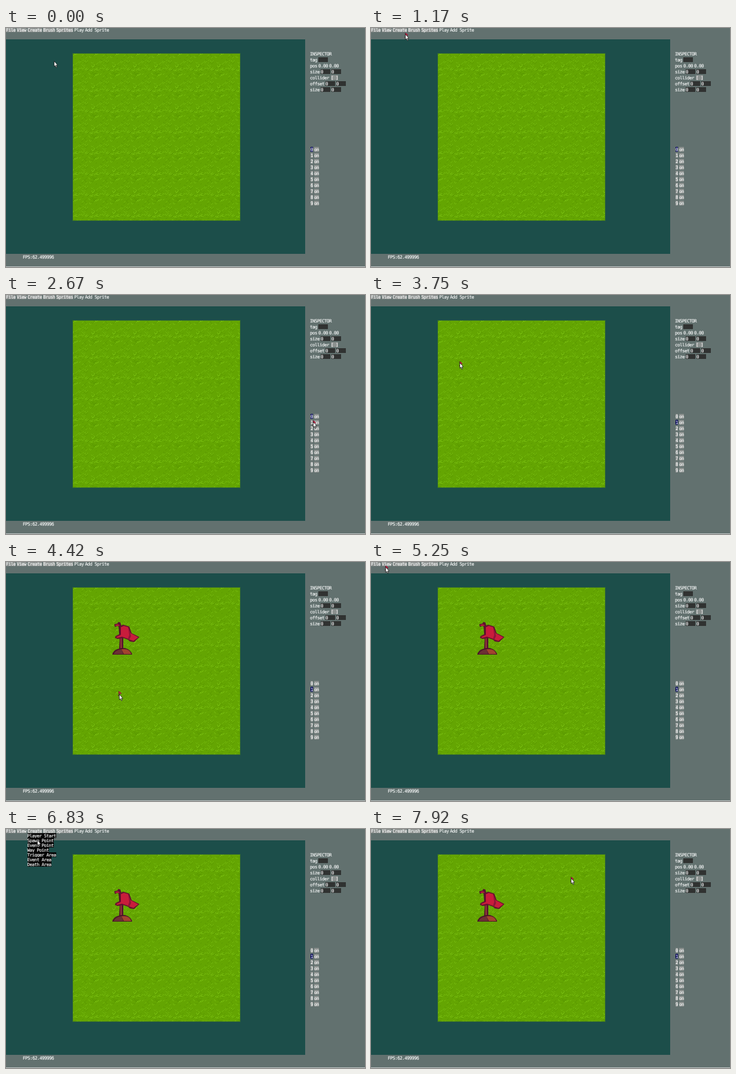
Write an HTML page with a canvas that moves like this. It is 600 by 400 pixels and loops after 8000 ms.

```html
<!DOCTYPE html>
<html lang="en">
<head>
<meta charset="utf-8">
<title>Level editor</title>
<style>
html, body { margin: 0; width: 100%; height: 100%; overflow: hidden; background: #62716f; }
#stage { position: relative; width: 600px; height: 400px; overflow: hidden; }
#stage > * { position: absolute; left: 0; top: 0; }
#stage > #view { width: 500px; height: 359px; top: 19px; background: #1c4e4a; }
#stage > #edge { width: 600px; height: 1px; top: 399px; background: #c3c9c8; }
#stage > #grass { left: 112px; top: 43px; box-shadow: 0 0 0 1px rgba(100, 166, 2, .3); }
text {
  font: 7.5px "DejaVu Sans Mono", "Liberation Mono", monospace;
  letter-spacing: -.515px;
  fill: #f6f8f8;
  stroke: #f6f8f8;
  stroke-width: .15px;
  white-space: pre;
}
rect { shape-rendering: crispEdges; }
</style>
</head>
<body>
<div id="stage">
  <div id="view"></div>
  <div id="edge"></div>
  <canvas id="grass" width="279" height="279"></canvas>
  <svg width="600" height="400" viewBox="0 0 600 400">
    <defs>
      <g id="flag">
        <path fill="#52122c" d="M187 101H191L193 108 196 128V146H189L190 130 188 107Z"/>
        <path fill="#8a3438" d="M191 109H193L194 145H191Z"/>
        <path fill="#5c1230" d="M181 104L186 103 188 100 192 104 191 109 186 107 182 109Z"/>
        <path fill="#b01c3a" d="M183 105L187 104 190 106 189 107 183 107Z"/>
        <path fill="#64102e" d="M190 107L196 105 206 108 210 119 223 125.500 214 134 207 133 204 130 195 127 187 129 182 127 183 124 191 120Z"/>
        <path fill="#c81c3c" d="M192 109L197 107 204 109 208 119 221 126 213 132 207 130 203 128 194 125 186 127 184 125.500 192 122Z"/>
        <path fill="#901436" d="M204 109L208 120 209 124 206 130 204 128 206 122Z"/>
        <path fill="#4a1428" d="M177.500 155Q179 148 187 145.500 196 142 204 146 210 150 211 155Z"/>
        <path fill="#6c3034" d="M180 154Q182 149 188 147L193 146 196 154Z"/>
        <path fill="#a2442e" d="M197 154L193 146Q206 144 209.500 154Z"/>
      </g>
    </defs>
    <g id="ui"></g>
    <use id="placed" href="#flag"/>
    <g id="menu"></g>
    <use id="preview" href="#flag"/>
    <path id="cursor" fill="#fff" stroke="#151515" stroke-width=".8"
      d="M.4 .4V9.4L2.3 7.7 3.8 11.2 5.2 10.6 3.8 7.2H6.4Z"/>
  </svg>
</div>
<script>
const $ = id => document.getElementById(id);
const LOOP = 8000, TICK = 1000 / 12;
const BUTTON = '#8c918f', FIELD = '#303231', BLACK = '#050505', NAVY = '#000058';

function add(parent, tag, attrs) {
  const el = document.createElementNS('http://www.w3.org/2000/svg', tag);
  for (const key in attrs) el.setAttribute(key, attrs[key]);
  return parent.appendChild(el);
}

// A label on an optional box; returns where the next one starts.
function label(parent, str, x, y, fill, chars = str.length) {
  if (fill) add(parent, 'rect', { x, y: y - 1, width: chars * 4, height: 8, fill });
  add(parent, 'text', { x, y: y + 6.1 }).textContent = str;
  return x + chars * 4 + 2;
}

function buildUi() {
  const ui = $('ui');
  let x = 0;
  ['File', 'View', 'Create', 'Brush', 'Sprites', 'Play', 'Add Sprite'].forEach((s, i) => {
    x = label(ui, s, x, 0, i < 5 && BUTTON);
  });

  const rows = [
    ['INSPECTOR'], ['tag', ''], ['pos'], ['size', '0', '0'],
    ['collider'], ['offset', '0', '0'], ['size', '0', '0']
  ];
  rows.forEach(([name, ...fields], i) => {
    const y = 40 + i * 10;
    let x = label(ui, name, 508, y);
    for (const f of fields) x = label(ui, f, x, y, FIELD, 4);
    if (name === 'pos') label(ui, '0.00', label(ui, '0.00', x, y), y);
    if (name === 'collider') label(ui, '[ ]', x + 1, y, BUTTON);
  });

  for (let i = 0; i < 10; i++) {
    const y = 200 + i * 10;
    label(ui, 'on', label(ui, String(i), 509, y, BUTTON), y, BUTTON);
  }

  ['Player Start', 'Spawn Point', 'Event Point', 'Way Point',
    'Trigger Area', 'Event Area', 'Death Area'].forEach((s, i) => {
    label($('menu'), s, 35.5, 8 + i * 8, BLACK);
  });
}

function drawGrass() {
  const size = 35, tile = document.createElement('canvas');
  tile.width = tile.height = size;
  const t = tile.getContext('2d');
  let seed = 17;
  const rnd = n => (seed = seed * 16807 % 2147483647) % n;
  const dot = (x, y) => t.fillRect((x + size) % size, (y + size) % size, 1, 1);
  t.fillStyle = '#64a502';
  t.fillRect(0, 0, size, size);
  // Tufts: two blades spreading from one root, dark ones under light ones
  for (let i = 0; i < 64; i++) {
    const x = rnd(size), y = rnd(size), left = rnd(4), right = 1 + rnd(4);
    t.fillStyle = i < 30 ? '#5b9a00' : '#73b80c';
    for (let j = 0; j < left; j++) dot(x - (j + 1 >> 1), y - j);
    for (let j = 0; j < right; j++) dot(x + 1 + j, y - j);
  }
  const g = $('grass').getContext('2d');
  g.fillStyle = g.createPattern(tile, 'repeat');
  g.fillRect(0, 0, 279, 279);
}

// Pointer path: tick, x, y
const path = [
  [0, 80, 55], [6, 51, 1], [7, 51, 1], [9, 57, 10], [14, 57, 10],
  [19, 208, 93], [22, 208, 93], [29, 525, 200], [32, 513, 212], [39, 513, 212],
  [45, 148, 113], [49, 167, 125], [54, 191, 232], [57, 191, 232],
  [63, 24, 8], [67, 25, 4], [70, 25, 4], [74, 40, 1], [76, 40, 1],
  [82, 52, 18], [84, 52, 18], [93, 323, 107], [95, 334, 82], [96, 334, 82]
];

function pointAt(k) {
  const i = Math.max(1, path.findIndex(p => p[0] >= k));
  const [t0, x0, y0] = path[i - 1], [t1, x1, y1] = path[i];
  const u = Math.max(0, (k - t0) / (t1 - t0)), e = u * u * (3 - 2 * u);
  return [Math.round(x0 + (x1 - x0) * e), Math.round(y0 + (y1 - y0) * e)];
}

buildUi();
drawGrass();
const digits = [...$('ui').querySelectorAll('rect[x="509"]')];
label($('ui'), '', 28, 380);
const fps = $('ui').lastChild;
const slow = [3, 16, 27, 36, 43, 60, 79, 88];
const show = (id, on) => $(id).setAttribute('visibility', on ? 'visible' : 'hidden');
const within = (k, a, b) => k >= a && k < b;

function render(time) {
  const k = Math.min(95, Math.floor((time % LOOP + 4) / TICK));
  const [x, y] = pointAt(k), [px, py] = pointAt(k - .12);
  $('cursor').setAttribute('transform', `translate(${x} ${y})`);
  $('preview').setAttribute('transform', `translate(${px + 2} ${py + 2}) scale(.14) translate(-200 -128)`);
  show('menu', within(k, 6, 14) || within(k, 74, 84));
  show('preview', within(k, 14, 74) || k >= 84);
  show('placed', k >= 52);
  const layer = k < 35 ? 0 : 1;
  digits.forEach((d, i) => d.setAttribute('fill', i === layer ? NAVY : BUTTON));
  fps.textContent = 'FPS:' + (slow.includes(k) ? '58.823528' : '62.499996');
}

const start = performance.now();
function frame() {
  render(performance.now() - start);
  requestAnimationFrame(frame);
}
frame();
</script>
</body>
</html>
```
